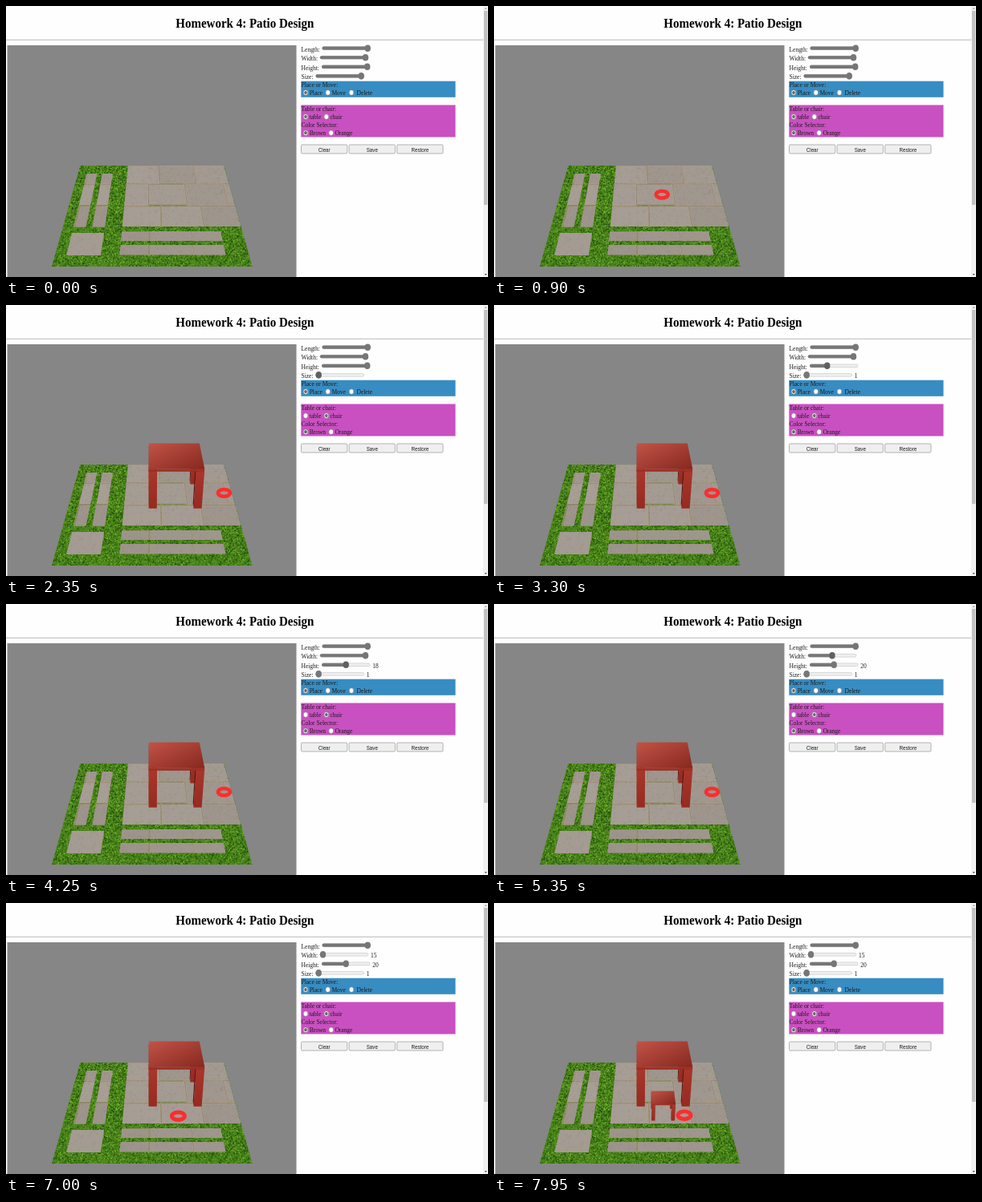
Write an HTML page with a canvas that moves like this. It is 600 by 338 pixels and loops after 8 s.

```html
<!DOCTYPE html>
<html lang="en">
<head>
<meta charset="utf-8">
<title>Patio Design</title>
<style>
  html, body { margin: 0; width: 100%; height: 100%; overflow: hidden; background: #fefefe; }
  canvas, svg { position: absolute; left: 0; top: 0; width: 600px; height: 338px; }
  text { font: 16px "Liberation Serif", serif; fill: #1c1c1c; }
  .title { font-size: 32px; font-weight: bold; text-anchor: middle; fill: #000; }
  .button { font: 13.33px "Liberation Sans", sans-serif; text-anchor: middle; }
</style>
</head>
<body>
<canvas id="patio" width="600" height="338"></canvas>
<svg id="page" viewBox="0 0 600 338"></svg>
<script>
const LOOP = 8000, STEP = 50;
const $ = id => document.getElementById(id);
const mix = (a, b, k) => a + (b - a) * k;
const progress = (t, start, end) => Math.min(1, Math.max(0, (t - start) / (end - start)));

// ---- Camera ----
// The floor is a unit square: u runs right, v toward the viewer, h is up (1 = table height).
const FAR = { width: 179, y: 199 }, NEAR = { width: 250, y: 325 }, CENTER_X = 181.7;
const SLOPE = (NEAR.y - FAR.y) / (NEAR.width - FAR.width);
const widthAt = (v, h = 0) => 1 / (mix(1 / FAR.width, 1 / NEAR.width, v) - 0.00027 * h);

function project(u, v, h = 0) {
  const width = widthAt(v, h);
  return [CENTER_X + (u - 0.5) * width, FAR.y + (width - FAR.width) * SLOPE - 0.321 * h * width];
}

// ---- Patio floor, painted once ----
const ctx = $('patio').getContext('2d');
let seed = 7;
const random = () => (seed = (seed * 16807) % 2147483647) / 2147483647;

function floorRect(u0, v0, u1, v1) {
  ctx.moveTo(...project(u0, v0));
  for (const corner of [[u1, v0], [u1, v1], [u0, v1]]) ctx.lineTo(...project(...corner));
  ctx.closePath();
}

function specks(count, size, color) {
  for (let i = 0; i < count; i++) {
    const [x, y] = project(random(), random());
    ctx.fillStyle = color(random());
    ctx.fillRect(x, y, size * (0.5 + random()), size * (0.5 + random()));
  }
}

function paintGrass() {
  ctx.beginPath();
  floorRect(0, 0, 1, 1);
  ctx.clip();
  ctx.fillStyle = '#47851a';
  ctx.fill();
  specks(24000, 1.2, k => `rgb(${mix(20, 128, k)},${mix(66, 188, k)},${mix(4, 52, k)})`);
}

function paintStones() {
  const third = 1 / 3, left = 0.06, strip = 0.236;
  ctx.beginPath();
  floorRect(third, 0, 1, 0.68);
  floorRect(left, 0.107, 0.13, 0.685);
  floorRect(0.165, 0.107, strip, 0.685);
  floorRect(left, 0.736, strip, 0.918);
  floorRect(third, 0.722, 0.88, 0.804);
  floorRect(third, 0.837, 0.88, 0.915);
  ctx.clip();

  // Running-bond slabs, each with its own tint and slightly crooked joints.
  const slab = 0.24, wobble = () => (random() - 0.5) * 0.02;
  for (let row = 0; row * slab < 1; row++) {
    for (let u = row % 2 ? -0.24 : -0.17; u < 1; u += slab) {
      const v = row * slab, tint = (random() - 0.5) * 12;
      ctx.beginPath();
      floorRect(u + wobble(), v + wobble(), u + slab + wobble(), v + slab + wobble());
      ctx.fillStyle = `rgb(${163 + tint},${154 + tint},${146 + tint})`;
      ctx.fill();
      ctx.strokeStyle = 'rgba(186,168,138,.6)';
      ctx.lineWidth = 1.8;
      ctx.stroke();
      ctx.strokeStyle = 'rgba(116,102,88,.6)';
      ctx.lineWidth = 0.7;
      ctx.stroke();
    }
  }
  specks(2500, 2, k => k < 0.5 ? 'rgba(178,168,158,.1)' : 'rgba(126,117,112,.1)');
}

function paintPatio() {
  ctx.fillStyle = '#868686';
  ctx.fillRect(1.5, 49, 360, 289);
  paintGrass();
  paintStones();
}

// ---- Furniture ----
const polygon = (points, fill) => `<polygon points="${points}" fill="${fill}"/>`;

// Only the left, front and top faces are ever in view.
function box(u0, v0, h0, u1, v1, h1, top = '#a8382e') {
  const face = (corners, fill) => polygon(corners.map(corner => project(...corner)), fill);
  return face([[u0, v0, h0], [u0, v1, h0], [u0, v1, h1], [u0, v0, h1]], '#591611') +
    face([[u0, v1, h0], [u1, v1, h0], [u1, v1, h1], [u0, v1, h1]], 'url(#front)') +
    face([[u0, v0, h1], [u1, v0, h1], [u1, v1, h1], [u0, v1, h1]], top);
}

function furniture({ u, v }, scale) {
  const half = 0.157 * scale, leg = 0.048 * scale, slab = 0.94 * scale;
  let shapes = '';
  for (const dv of [-half, half - leg])
    for (const du of [-half, half - leg])
      shapes += box(u + du, v + dv, 0, u + du + leg, v + dv + leg, slab);
  return shapes + box(u - half, v - half, slab, u + half, v + half, scale, 'url(#top)');
}

const spots = {
  entry: { u: 0.9, v: 0.15 },
  table: { u: 0.638, v: 0.36 },
  right: { u: 0.951, v: 0.353 },
  front: { u: 0.651, v: 0.612 },
  chair: { u: 0.631, v: 0.588 },
  last: { u: 0.756, v: 0.603 }
};

// ---- Page markup ----
const SX = 600 / 1280, SY = 0.55;   // the page is shown wider than tall
const LEFT = 367.5;
const label = (x, y, text, cls = '', id = '') =>
  `<text class="${cls}" id="${id}" transform="translate(${x} ${y}) scale(${SX} ${SY})">${text}</text>`;
const rect = (x, y, w, h, fill, extra = '') =>
  `<rect x="${x}" y="${y}" width="${w}" height="${h}" fill="${fill}" ${extra}/>`;

const rowY = row => 101.2 + 10.03 * row;
const rowLabel = (row, text) => label(LEFT, rowY(row), text);
function option(row, x, text, checked, id = '') {
  const place = `cx="${x}" cy="${rowY(row) - 3.2}"`;
  return `<ellipse ${place} rx="2.9" ry="3.3" fill="#fff" stroke="#757575" stroke-width=".6"/>
    <ellipse id="${id}" ${place} rx="1.8" ry="2.1" fill="#666" opacity="${+checked}"/>` +
    label(x + 4.7, rowY(row), text);
}

const button = (text, i) =>
  rect(LEFT + 59.6 * i, 173, 57.3, 11, '#efefef', `id="${text}" rx="1.3" stroke="#858585" stroke-width=".6"`) +
  label(LEFT + 59.6 * i + 28.7, 181.6, text, 'button');

const TRACK = 60.4, THUMB = 3.7;
const sliders = {
  length: { text: 'Length:', x: 393.5, min: 10, max: 30 },
  width: { text: 'Width:', x: 390.8, min: 15, max: 30 },
  height: { text: 'Height:', x: 393, min: 10, max: 30 },
  size: { text: 'Size:', x: 385.5, min: 1, max: 10 }
};
function slider([name, { text, x }], row) {
  const y = 52.7 + 11.55 * row;
  return label(LEFT, y + 4.1, text) +
    rect(x + 0.3, y - 1.9, TRACK - 0.6, 3.8, '#efefef', 'rx="1.9" stroke="#b8b8b8" stroke-width=".5"') +
    rect(x, y - 2.1, 0, 4.2, '#767676', `id="${name}Fill" rx="2"`) +
    `<ellipse id="${name}Thumb" cy="${y}" rx="${THUMB}" ry="4.3"/>` +
    label(x + TRACK + 2.8, y + 4.1, '', '', name + 'Value');
}

const gradient = (id, x2, y2, from, to) =>
  `<linearGradient id="${id}" x2="${x2}" y2="${y2}"><stop stop-color="${from}"/><stop offset="1" stop-color="${to}"/></linearGradient>`;

$('page').innerHTML =
  gradient('top', 1, 1, '#c25347', '#86281f') + gradient('front', 0, 1, '#a8362b', '#962a21') +
  label(297.3, 27, 'Homework 4: Patio Design', 'title') +
  rect(0, 41.8, 594, 0.8, '#a8a8a8') +
  rect(594, 0, 6, 338, '#f1f1f1') + rect(595, 6, 4.4, 242, '#c1c1c1') +
  polygon('595.7,4 597.2,2 598.7,4', '#a3a3a3') + polygon('595.7,334 597.2,336 598.7,334', '#505050') +
  Object.entries(sliders).map(slider).join('') +
  rect(367.3, 93.7, 192.2, 20.1, '#378cc1') +
  rowLabel(0, 'Place or Move:') +
  option(1, 373, 'Place', true) + option(1, 400.7, 'Move', false) + option(1, 430, '&#160;Delete', false) +
  rect(367.3, 123.5, 192.2, 40, '#c950c1') +
  rowLabel(3, 'Table or chair:') +
  option(4, 373, 'table', true, 'tableDot') + option(4, 398.8, 'chair', false, 'chairDot') +
  rowLabel(5, 'Color Selector:') +
  option(6, 373, 'Brown', true) + option(6, 404.7, 'Orange', false) +
  ['Clear', 'Save', 'Restore'].map(button).join('') +
  `<g id="table">${furniture(spots.table, 1)}</g><g id="chair">${furniture(spots.chair, 0.42)}</g>
   <ellipse id="ring" rx=".037" ry=".022" fill="none" stroke="#fb2d2f" stroke-width=".023"/>`;

// ---- Timeline ----
const ringMoves = [
  { start: 50, end: 600, to: 'table' },
  { start: 1200, end: 1350, to: 'right' },
  { start: 6800, end: 7000, to: 'front' },
  { start: 7050, end: 7300, to: 'chair' },
  { start: 7800, end: 7950, to: 'last' }
];
// Sliders start at the maximum; a level is a fraction of the range.
const drags = [
  { name: 'size', start: 2350, level: 0 },
  { name: 'height', start: 3300, level: 0.34 },
  { name: 'height', start: 3550, level: 0.42 },
  { name: 'height', start: 4200, level: 0.5 },
  { name: 'width', start: 5350, level: 0.5 },
  { name: 'width', start: 5350, end: 5500, level: 0 }
];
const releases = { size: [2500], height: [3900, 4500], width: [5700], length: [] };
const hovers = [
  { name: 'size', start: 1950, end: 2650 },
  { name: 'height', start: 2650, end: 4650 },
  { name: 'width', start: 4650, end: 5800 },
  { name: 'length', start: 6600, end: 6650 }
];
const during = (t, { start, end }) => t >= start && t < end;

function levelAt(name, t) {
  return drags.filter(drag => drag.name === name && t >= drag.start)
    .reduce((level, { start, end, level: to }) => mix(level, to, end ? progress(t, start, end) : 1), 1);
}

function valueAt(name, t) {
  const released = releases[name].filter(time => time <= t).pop();
  const { min, max } = sliders[name];
  return released ? Math.round(mix(min, max, levelAt(name, released))) : '';
}

function ringAt(t) {
  return ringMoves.reduce(({ u, v }, { start, end, to }) => {
    const k = progress(t, start, end);
    return { u: mix(u, spots[to].u, k), v: mix(v, spots[to].v, k) };
  }, spots.entry);
}

function render(t) {
  const show = (id, on) => $(id).setAttribute('visibility', on ? 'visible' : 'hidden');
  for (const name in sliders) {
    const offset = mix(THUMB, TRACK - THUMB, levelAt(name, t));
    const hovered = hovers.some(hover => hover.name === name && during(t, hover));
    $(name + 'Fill').setAttribute('width', offset);
    $(name + 'Thumb').setAttribute('cx', sliders[name].x + offset);
    $(name + 'Thumb').setAttribute('fill', hovered ? '#606060' : '#767676');
    $(name + 'Value').textContent = valueAt(name, t);
  }
  $('tableDot').setAttribute('opacity', +(t < 1400));
  $('chairDot').setAttribute('opacity', +(t >= 1400));
  $('Clear').setAttribute('fill', during(t, { start: 1550, end: 1600 }) ? '#e2e2e2' : '#efefef');

  const { u, v } = ringAt(t);
  $('ring').setAttribute('transform', `translate(${project(u, v)}) scale(${widthAt(v)})`);
  show('ring', t >= 50);
  show('table', t >= 1200);
  show('chair', t >= 7800);
}

paintPatio();
const start = performance.now();
function frame() {
  const t = (performance.now() - start) % LOOP;
  render(Math.floor(t / STEP) * STEP);
  requestAnimationFrame(frame);
}
frame();
</script>
</body>
</html>
```
